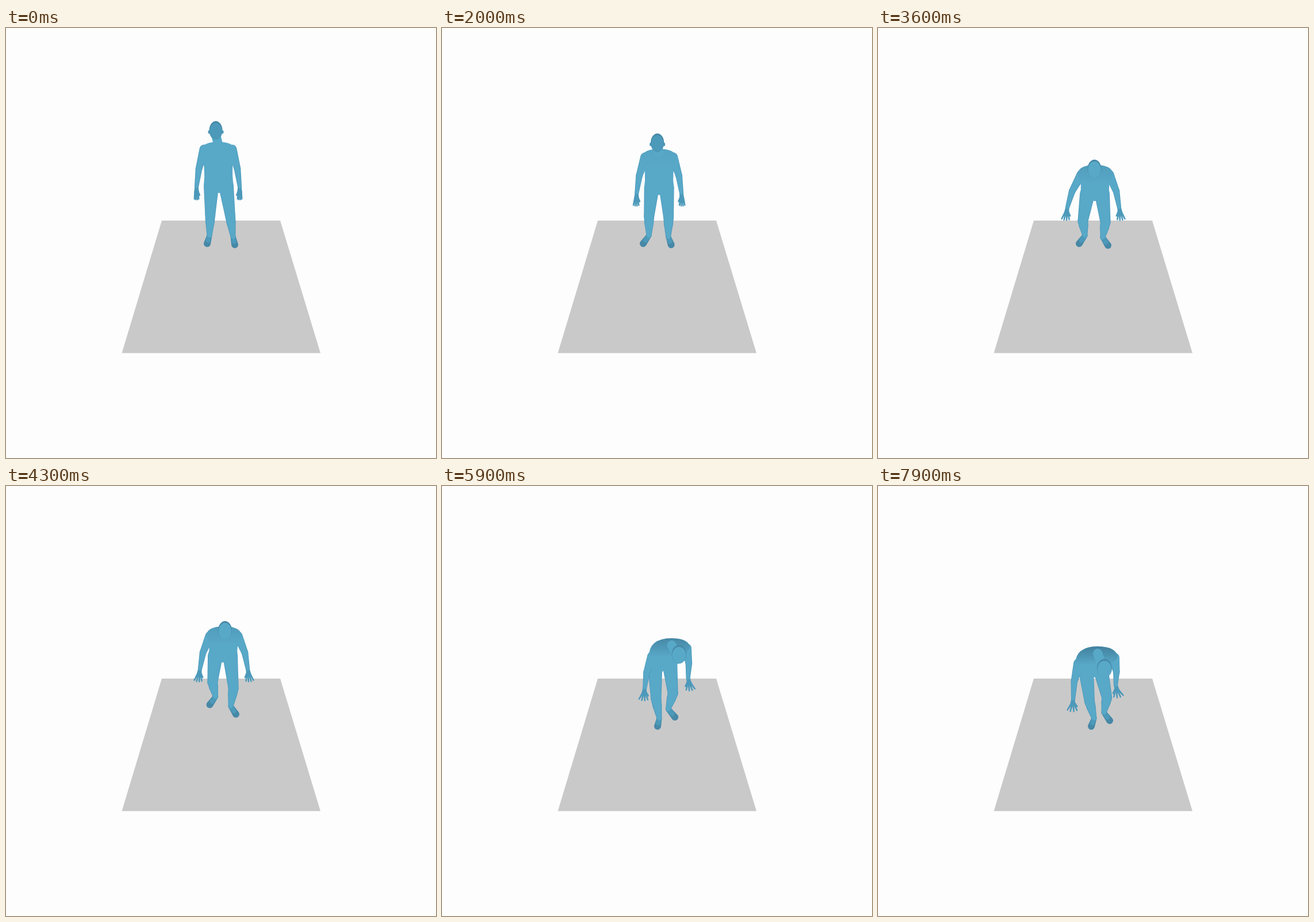
These frames come from a looping animation (748 px wide and 748 px high, 8000 ms). An HTML page with a canvas:

```html
<!DOCTYPE html>
<html lang="en">
<head>
<meta charset="utf-8">
<title>Walking figure</title>
<style>
  html, body { margin: 0; width: 100%; height: 100%; overflow: hidden; background: #fdfdfd; }
  canvas { display: block; }
</style>
</head>
<body>
<canvas id="stage" width="748" height="748"></canvas>
<script>
const ctx = document.getElementById('stage').getContext('2d');
const LOOP = 8000, STEP = 100;
const BASE = '#58a8c8', RIM = '#4c99ba', DARK = '#4688a6';

const clamp = v => Math.max(0, Math.min(1, v));
const mix = (a, b, k) => a + (b - a) * k;
const between = (a, b, k) => [mix(a[0], b[0], k), mix(a[1], b[1], k)];
const add = (p, x, y) => [p[0] + x, p[1] + y];
const polar = (p, angle, d) => add(p, Math.cos(angle) * d, Math.sin(angle) * d);

// The pose is a sum of eased movements. Sign -1 is the left of the screen, 1 the right.
function poseAt(t) {
  const ease = (from, to) => {
    const u = clamp((t - from) / (to - from));
    return u * u * (3 - 2 * u);
  };
  const bump = (from, to) => Math.sin(Math.PI * ease(from, to));

  const shift = ease(0, 1200);
  const bow = ease(1450, 2850);
  const sink = ease(2900, 4300);
  const lean = ease(4300, 5200);
  const crouch = ease(5200, 6500);
  const settle = ease(6700, 7900);
  const stepRight = ease(3500, 4200);
  const stepLeft = ease(3900, 5000);
  const nextLeft = ease(5100, 5700);
  const reach = bump(2900, 4300);
  const sway = bump(5200, 6700);

  const crotch = [
    370 + 8 * shift - bow + 8 * lean - 3 * crouch - 7 * settle,
    287 + shift + 7 * bow + 12 * sink + 5 * lean + 19 * crouch + 2 * settle
  ];
  const chest = add(crotch,
    -1 + shift + 2 * sink + 8 * lean - 5 * crouch + 5 * sway,
    -76 + 30 * bow + 8 * lean + 9 * crouch);
  const head = add(chest,
    -4 + 2 * shift - 3 * bow + 7 * sink + 11 * lean + 7 * crouch - 6 * settle,
    -33 + 23 * bow + 8 * lean + 9 * crouch + 6 * settle);
  const back = add(chest, 4 * lean - 2 * settle,
    -13 - 4 * bow - 4 * lean - 7 * crouch + 3 * settle);

  function arm(sign, tuck, lift) {
    const tilt = 5 * lean + 4 * crouch - 4 * settle;
    const shoulder = add(chest, sign * (24.5 + 4 * lean + 2 * crouch), -sign * tilt);
    const elbow = add(shoulder, sign * (9 + 3 * bow - 0.55 * tuck), 34 - 5 * bow - lift / 2);
    const wrist = add(shoulder, sign * (13 + 4 * bow - tuck), 65 - 8 * bow - lift);
    return { sign, shoulder, elbow, wrist };
  }

  function leg(sign, toe, turn) {
    const hip = add(crotch, sign * 13, -11);
    const ankle = add(toe, turn, -14);
    const bent = sign * 5 * bow + 4 * crouch - 2 * settle;
    const knee = add(between(hip, ankle, 0.56 + 0.08 * bow), bent, 0);
    return { hip, knee, ankle, toe };
  }

  const toeLeft = [
    350 + 15 * stepLeft + 10 * nextLeft - 4 * settle,
    375 + 18 * stepLeft + 25 * nextLeft
  ];
  const toeRight = [
    398 + 2 * bow + 3 * lean + 4 * crouch - 4 * settle,
    377 + 20 * stepRight + 9 * crouch + 2 * settle
  ];

  return {
    head, back, crotch, bow, crouch,
    bend: 0.3 * bow + 0.3 * lean + 0.4 * crouch,
    arms: [
      arm(-1, 7 * crouch - 7 * reach, 3 * lean - 7 * settle),
      arm(1, 14 * lean, 10 * crouch)
    ],
    legs: [
      leg(-1, toeLeft, 4 + 6 * shift - 7 * nextLeft + 2 * settle),
      leg(1, toeRight, -3 - 6 * bow - 5 * crouch + 4 * settle)
    ]
  };
}

function capsule(a, b, ra, rb, color) {
  const angle = Math.atan2(b[1] - a[1], b[0] - a[0]), q = Math.PI / 2;
  ctx.fillStyle = color;
  ctx.beginPath();
  ctx.arc(...a, ra, angle + q, angle + 3 * q);
  ctx.arc(...b, rb, angle - q, angle + q);
  ctx.fill();
}

function ellipse(x, y, rx, ry, color) {
  ctx.fillStyle = color;
  ctx.beginPath();
  ctx.ellipse(x, y, rx, ry, 0, 0, 7);
  ctx.fill();
}

// A chain of tapered parts with a thin darker rim
function limb(points, radii) {
  for (const [inset, color] of [[0, RIM], [0.9, BASE]]) {
    for (let i = 1; i < points.length; i++) {
      capsule(points[i - 1], points[i], radii[i - 1] - inset, radii[i] - inset, color);
    }
  }
}

function drawArm({ sign, shoulder, elbow, wrist }, { bow, crouch }) {
  const angle = Math.atan2(24, sign * 4 * bow + 2 * crouch);
  const spread = 0.06 + 0.16 * bow + 0.1 * crouch;
  const palm = polar(wrist, angle, 9);
  const thumb = polar(wrist, angle, 4);
  capsule(wrist, palm, 3.2, 4.2, RIM);
  for (let i = -1.5; i <= 1.5; i++) {
    const root = add(palm, i * 1.7, 0);
    capsule(root, polar(root, angle - i * spread, 14 - Math.abs(i)), 1.7, 1.2, RIM);
  }
  capsule(thumb, polar(thumb, angle + sign * (0.4 + spread), 12), 2, 1.3, RIM);
  limb([shoulder, elbow, wrist], [8 + 1.5 * crouch, 5.8, 3.6]);
}

function drawLeg({ hip, knee, ankle, toe }) {
  capsule(ankle, toe, 4.5, 6, DARK);
  capsule(ankle, between(ankle, toe, 0.6), 4, 4, RIM);
  limb([hip, knee, between(knee, ankle, 0.35), ankle], [13, 9, 8, 4.5]);
}

function drawTorso({ arms, back, crotch, bow, bend }) {
  const [x, y] = crotch;
  const [left, right] = arms.map(a => add(a.shoulder, a.sign * 6, 0));
  const crown = p => [mix(p[0], back[0], 0.15 * (1 - bow)), back[1] + 0.5];
  const waist = p => [mix(p[0], x, 0.3), mix(p[1], y, 0.4)];
  const shade = ctx.createLinearGradient(0, back[1], 0, back[1] + 32);
  shade.addColorStop(0, `rgba(62,122,150,${(bend * 0.85).toFixed(3)})`);
  shade.addColorStop(1, 'rgba(62,122,150,0)');

  ctx.beginPath();
  ctx.moveTo(...left);
  ctx.quadraticCurveTo(...crown(left), ...back);
  ctx.quadraticCurveTo(...crown(right), ...right);
  ctx.quadraticCurveTo(...waist(right), x + 26, y - 12);
  ctx.lineTo(x + 22, y - 3);
  ctx.lineTo(x, y);
  ctx.lineTo(x - 22, y - 3);
  ctx.lineTo(x - 26, y - 12);
  ctx.quadraticCurveTo(...waist(left), ...left);
  for (const fill of [BASE, shade]) {
    ctx.fillStyle = fill;
    ctx.fill();
  }
}

function drawHead({ head, back, bow, bend }) {
  const [x, y] = head;
  const width = 11.5 + bend * 1.5;
  capsule(add(head, 0, 8), add(back, 0, 8 * bow + 4), 8, 8, BASE);
  if (bow < 0.5) {
    for (const sign of [-1, 1]) ellipse(x + sign * 12, y + 3, 1.5, 3, RIM);
  }
  ellipse(x, y, width, 16, DARK);
  ellipse(x, y + 1.5, width - 0.7, 14.5, bow < 0.5 ? RIM : BASE);
}

function draw(t) {
  const pose = poseAt(t);
  ctx.fillStyle = '#fdfdfd';
  ctx.fillRect(0, 0, 748, 748);
  ctx.fillStyle = '#c9c9c9';
  ctx.beginPath();
  ctx.moveTo(271, 335);
  ctx.lineTo(477, 335);
  ctx.lineTo(547, 565.5);
  ctx.lineTo(201.5, 565.5);
  ctx.fill();

  pose.legs.forEach(drawLeg);
  pose.arms.forEach(arm => drawArm(arm, pose));
  drawTorso(pose);
  drawHead(pose);
}

function frame() {
  draw(Math.floor(performance.now() % LOOP / STEP) * STEP);
  requestAnimationFrame(frame);
}
frame();
</script>
</body>
</html>
```
